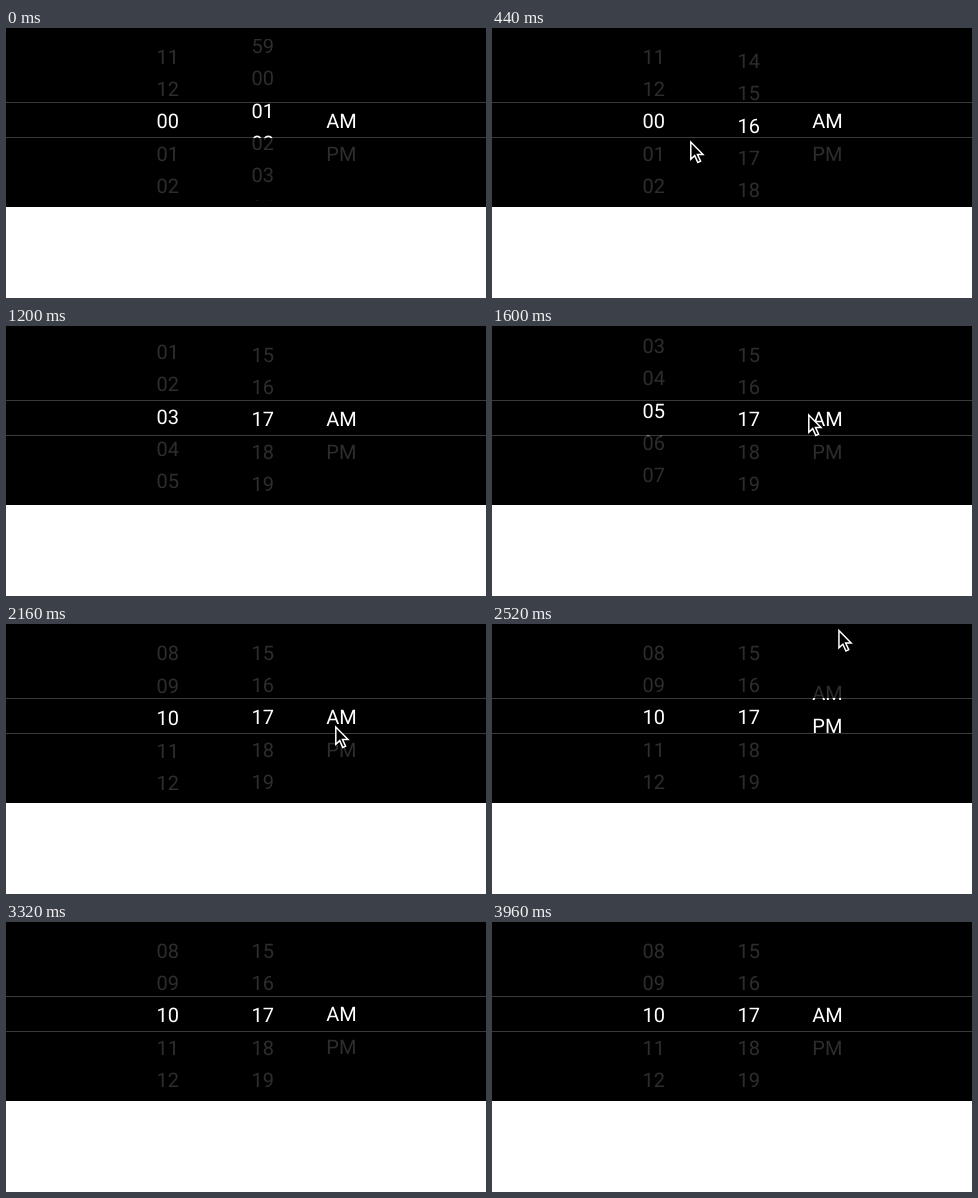
Recreate the animation shown at these times as an HTML page. Size 480 by 270 pixels, loop 4.16 s.

```html
<!DOCTYPE html>
<html lang="en">
<head>
<meta charset="utf-8">
<title>Time picker</title>
<style>
  html, body { margin: 0; width: 100%; height: 100%; overflow: hidden; background: #fff; }
  svg { display: block; width: 100vw; height: 100vh; }
  text { font: 400 20px Roboto, sans-serif; text-rendering: geometricPrecision; }
</style>
</head>
<body>
<svg viewBox="0 0 480 270">
  <defs>
    <clipPath id="wheel"><rect y="11" width="480" height="162"/></clipPath>
    <clipPath id="band"><rect y="74" width="480" height="36"/></clipPath>
    <clipPath id="panel"><rect width="480" height="179"/></clipPath>
  </defs>
  <rect width="480" height="179"/>
  <g id="dim" fill="#2d2d2d" clip-path="url(#wheel)"></g>
  <rect y="75" width="480" height="34"/>
  <path d="M0 74.5H480M0 109.5H480" stroke="#3a3a3a"/>
  <g id="lit" fill="#fff" clip-path="url(#band)"></g>
  <g clip-path="url(#panel)">
    <path id="cursor" d="M.8 1V18.2L4.7 14.6 7.8 21.4 10.6 20.1 7.5 13.5H13Z" stroke="#fff" stroke-width="1.5"/>
  </g>
</svg>
<script>
const LOOP = 4160, STEP = 40, PITCH = 32.35, BASELINE = 100.2, REACH = 3;
const $ = id => document.getElementById(id);
const mod = (n, m) => (n % m + m) % m;
const clamp = (t, a, b) => Math.min(1, Math.max(0, (t - a) / (b - a)));
const smooth = u => u * u * (3 - 2 * u);
const twoDigits = n => String(n).padStart(2, '0');

// A flung wheel slows down until it rests at the end value.
const fling = (t, start, stop, from, to) =>
  to - (to - from) * (1 - clamp(t, start, stop)) ** 3.2;

const columns = [
  {
    x: 150.6,
    label: n => twoDigits(mod(n, 13)),
    value: t => t < 1200 ? 3.08 * clamp(t, 900, 1200) ** 3 : fling(t, 1200, 2306, 3.08, 23)
  },
  {
    x: 245.5,
    label: n => twoDigits(mod(n, 60)),
    value: t => fling(t, 0, 787, 1.33, 17)
  },
  {
    x: 320.3,
    label: n => ['AM', 'PM'][n] || '',
    value: t => smooth(clamp(t, 2280, 2640)) - smooth(clamp(t, 2980, 3360))
  }
];

// The pointer shows only between drags; each stroke lists [time, x, y].
const strokes = [
  [[80, 250, -14], [440, 198, 113], [560, 190, 116], [800, 154, 122], [900, 152, 118]],
  [[1240, 150, 14], [1600, 316, 88], [1680, 323, 94], [2160, 329, 102], [2240, 340, 106]],
  [[2480, 346, 2], [2720, 348, 50], [2960, 343, 60]],
  [[3200, 343, 150], [3320, 338, 182]]
];

function addText(layer, x) {
  const node = document.createElementNS('http://www.w3.org/2000/svg', 'text');
  node.setAttribute('x', x);
  return layer.appendChild(node);
}

for (const col of columns) {
  col.rows = [];
  for (let i = -REACH; i <= REACH; i++)
    col.rows.push({ i, nodes: [addText($('dim'), col.x), addText($('lit'), col.x)] });
}

function drawColumn(col, t) {
  const value = col.value(t), middle = Math.round(value);
  for (const { i, nodes } of col.rows) {
    const n = middle + i, y = BASELINE + (n - value) * PITCH;
    for (const node of nodes) {
      node.textContent = col.label(n);
      node.setAttribute('y', y.toFixed(2));
    }
  }
}

function pointerAt(t) {
  const path = strokes.find(s => t >= s[0][0] && t <= s[s.length - 1][0]);
  if (!path) return null;
  const k = Math.max(1, path.findIndex(p => p[0] >= t));
  const [t0, x0, y0] = path[k - 1], [t1, x1, y1] = path[k];
  const u = smooth(clamp(t, t0, t1));
  return [x0 + (x1 - x0) * u, y0 + (y1 - y0) * u];
}

function draw(t) {
  columns.forEach(col => drawColumn(col, t));
  const p = pointerAt(t);
  $('cursor').setAttribute('visibility', p ? 'visible' : 'hidden');
  if (p) $('cursor').setAttribute('transform', `translate(${p[0].toFixed(2)} ${p[1].toFixed(2)})`);
}

const begin = performance.now();
function tick() {
  const t = (performance.now() - begin) % LOOP;
  draw(Math.floor(t / STEP) * STEP);
  requestAnimationFrame(tick);
}
tick();
</script>
</body>
</html>
```
